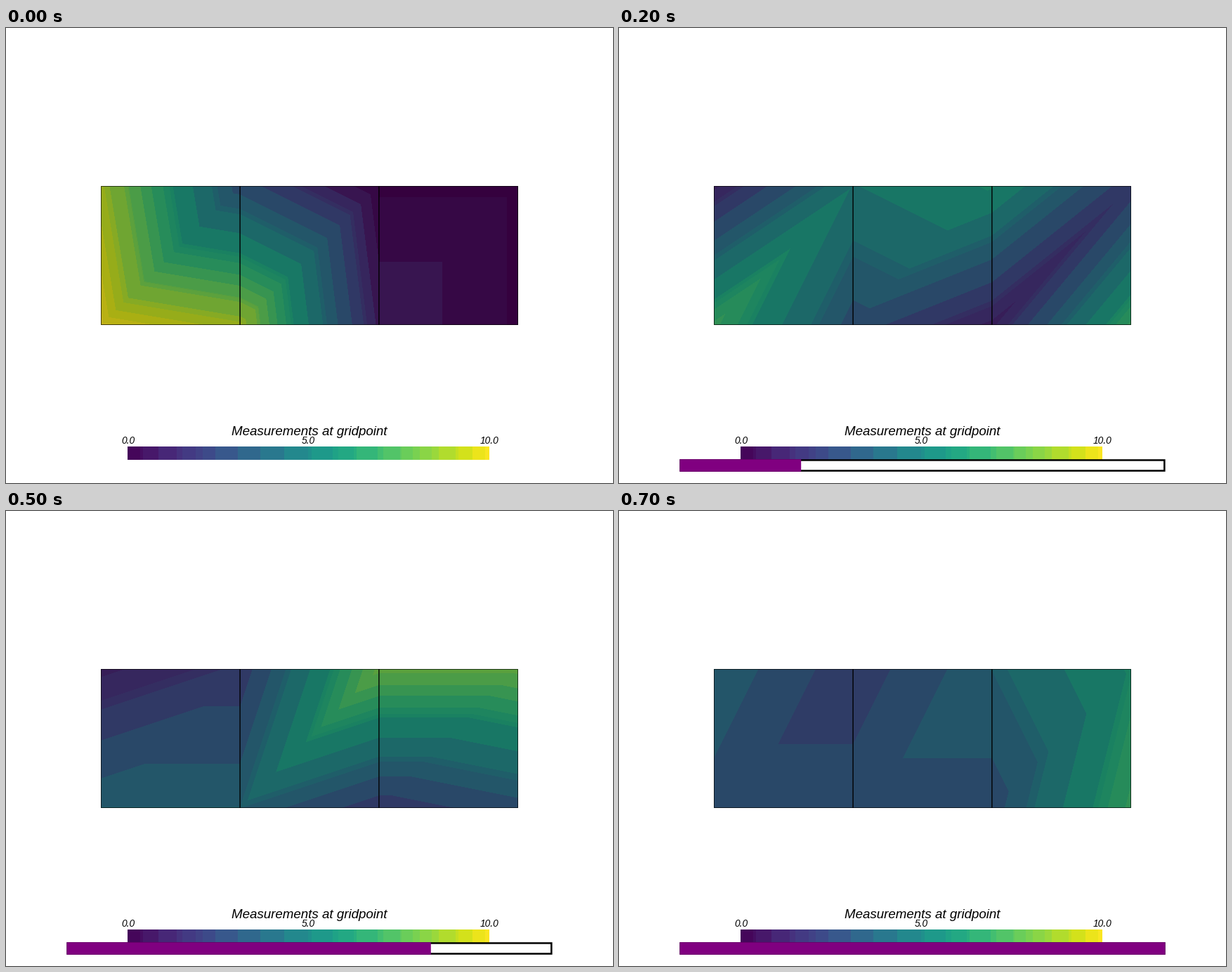
Recreate the animation shown at these times as a matplotlib script. Size 864 by 648 pixels, loop 800 ms.

```python
import matplotlib
import matplotlib.pyplot as plt
import numpy as np
from matplotlib.animation import FuncAnimation
from matplotlib.patches import Rectangle

W, H, DPI = 864, 648, 100
PX = 72 / DPI
CELL = 197.8
LEFT, BOTTOM = W / 2 - 1.5 * CELL, H / 2 + CELL / 2
X0, X1, Y0, Y1 = 135, 729, 225, 423
LIGHT = np.array([0.78, 0.773, 0.738])
VIRIDIS = matplotlib.colormaps["viridis"]

# Gridpoint values per step: bottom row, top row
STEPS = [
    ((10, 9, 1, 0), (9, 3, 0, 0)),
    ((7, 3, 1, 7), (1, 5, 6, 2)),
    ((4, 4, 2, 3), (1, 2, 8, 8)),
    ((3, 3, 3, 7), (4, 2, 4, 6)),
]


def banded(values, light=1.0):
    """Map values 0..10 to viridis, merged into coarse colour bands."""
    index = np.clip((values * 25.6).astype(int), 0, 255)
    rgb = (VIRIDIS(index, bytes=True)[..., :3] * light).reshape(-1, 3)
    r, g, b = rgb.astype(int).T
    key = (r >> 5) * 256 + (g >> 4) * 8 + (b >> 5)
    _, band = np.unique(key, return_inverse=True)
    band = band.ravel()
    count = np.bincount(band)
    mean = [np.bincount(band, channel) / count for channel in rgb.T]
    colors = np.round(np.stack(mean, axis=1)).astype(np.uint8)
    return colors[band].reshape(values.shape + (3,))


def field(bottom, top):
    """Interpolate over cells split from bottom left to top right."""
    bottom, top = np.array(bottom, float), np.array(top, float)
    x, y = np.meshgrid(np.arange(X0, X1) + 0.5, np.arange(Y0, Y1) + 0.5)
    s = np.clip((x - LEFT) / CELL, 0, 3)
    w = np.clip((BOTTOM - y) / CELL, 0, 1)
    cell = np.minimum(s.astype(int), 2)
    u = s - cell
    bl, br, tl, tr = bottom[cell], bottom[cell + 1], top[cell], top[cell + 1]
    lower = bl + u * (br - bl) + w * (tr - br)
    upper = bl + w * (tl - bl) + u * (tr - tl)
    return np.where(u >= w, lower, upper)


fig = plt.figure(figsize=(W / DPI, H / DPI), dpi=DPI, facecolor="white")
ax = fig.add_axes([0, 0, 1, 1])
ax.axis("off")


def picture(data, x0, x1, y0, y1):
    return ax.imshow(data, extent=(x0, x1, y1, y0), aspect="auto",
                     interpolation="nearest", zorder=1)


def box(x0, y0, x1, y1, color, z):
    patch = Rectangle((x0, y0), x1 - x0, y1 - y0, fc=color, lw=0, zorder=z,
                      snap=False)
    return ax.add_patch(patch)


def label(x, baseline, text, size):
    ax.text(x, baseline, text, family="Liberation Sans", style="italic",
            fontsize=size * PX, ha="center", va="baseline", color="black",
            zorder=3)


meshes = [banded(field(*step), LIGHT) for step in STEPS]
mesh = picture(meshes[0], X0, X1, Y0, Y1)

ax.add_patch(Rectangle((X0 + 0.5, Y0 + 0.5), X1 - X0 - 1, Y1 - Y0 - 1,
                       fill=False, ec="black", lw=PX, alpha=0.65, zorder=2,
                       snap=False))
for k in (1, 2):
    x = LEFT + k * CELL
    ax.plot([x, x], [Y0, Y1], color="black", lw=1.4 * PX, snap=False,
            solid_capstyle="butt", zorder=2)

ramp = np.tile((np.arange(515) + 0.5) / 51.5, (19, 1))
picture(banded(ramp), 173, 688, 596, 615)
label(432, 580, "Measurements at gridpoint", 18.75)
for x, text in ((173.5, "0.0"), (430, "5.0"), (688, "10.0")):
    label(x, 591.7, text, 13.7)

BAR0, BAR1 = 0.1 * W, 0.9 * W
BAR_TOP, BAR_BOTTOM, BORDER = 614.2, 631.8, 2.5
frame_box = box(BAR0, BAR_TOP, BAR1, BAR_BOTTOM, "black", 4)
inner_box = box(BAR0 + BORDER, BAR_TOP + BORDER, BAR1 - BORDER,
                BAR_BOTTOM - BORDER, "white", 5)
progress = box(BAR0, BAR_TOP, BAR0, BAR_BOTTOM, "purple", 6)

ax.set_xlim(0, W)
ax.set_ylim(H, 0)


def update(i):
    # The mesh changes on even ticks, the bar on odd ones
    mesh.set_data(meshes[i // 2])
    done = (i + 1) // 2 / len(STEPS)
    progress.set_width((BAR1 - BAR0) * done)
    for part in (frame_box, inner_box, progress):
        part.set_visible(done > 0)
    return mesh, frame_box, inner_box, progress


anim = FuncAnimation(fig, update, frames=2 * len(STEPS), interval=100,
                     repeat=True, repeat_delay=0, blit=False)
plt.show()
```
